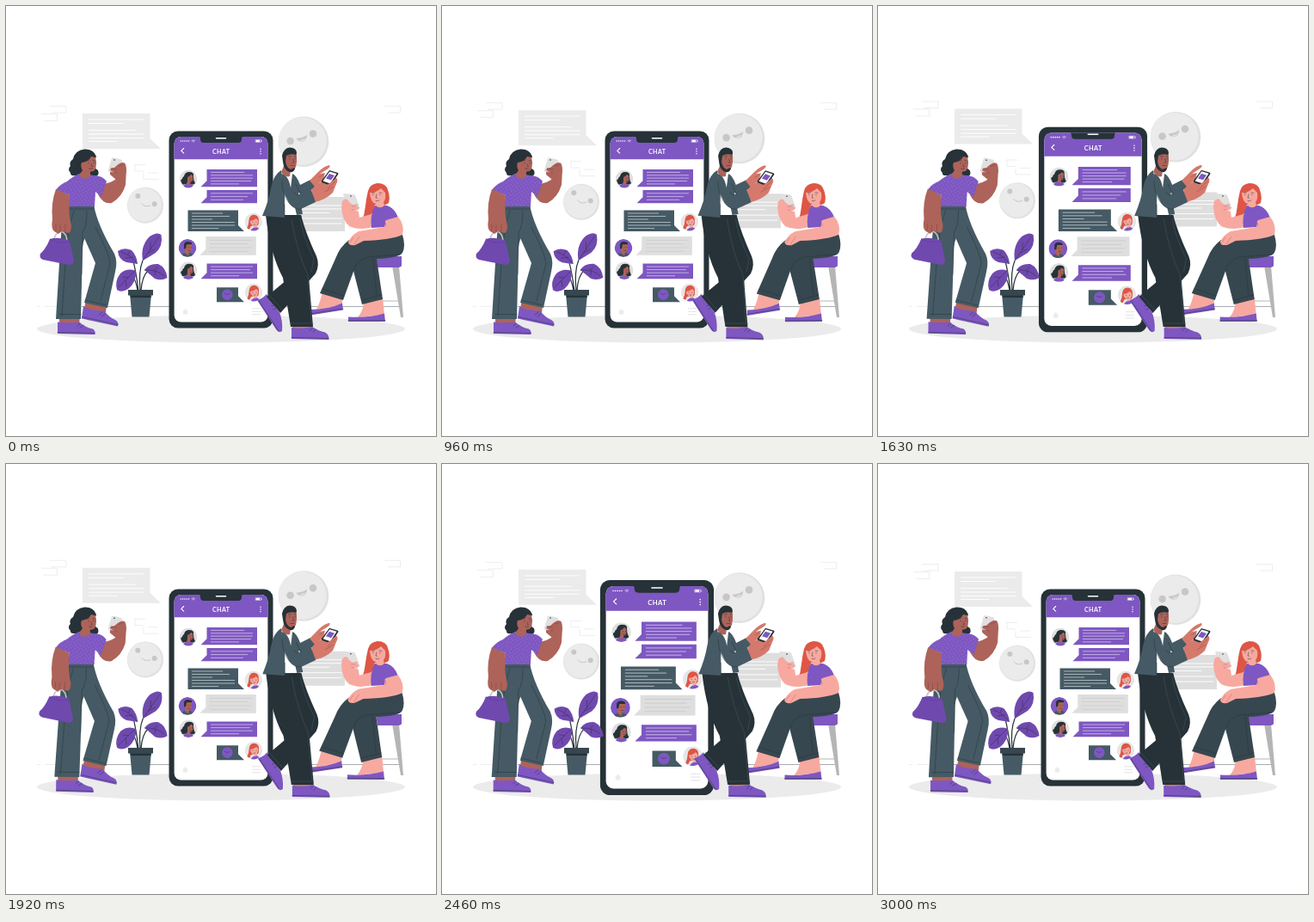
Write an HTML page that moves like this. It is 500 by 500 pixels and loops after 3.04 s.

```html
<!DOCTYPE html>
<html lang="en">
<head>
<meta charset="utf-8">
<title>Chat</title>
<style>
html, body { margin: 0; width: 100%; height: 100%; overflow: hidden; background: #fff }
svg { display: block; width: 100vw; height: 100vh }
.p { fill: #7e57c2 } .pd { fill: #7049af }
.d { fill: #263238 } .m { fill: #455a64 } .n { fill: #37474f }
.brown { fill: #ad6359 } .tan { fill: #d4796c } .pink { fill: #f7a9a0 } .red { fill: #de5645 }
.g { fill: #ebebeb } .h { fill: #c7c7c7 }
.l { fill: none; stroke: #263238; stroke-width: .5; stroke-linecap: round; stroke-linejoin: round }
.w { fill: none; stroke: #fff; stroke-linecap: round; stroke-linejoin: round }
text { font: 700 7px Lato, sans-serif; letter-spacing: .4px; fill: #fff; text-anchor: middle }
</style>
</head>
<body>
<svg viewBox="0 0 500 500">
<defs>
  <pattern id="dots" width="5" height="5" patternUnits="userSpaceOnUse" patternTransform="rotate(12)">
    <circle cx="1.2" cy="1.2" r=".4" fill="#c5b3e4"/><circle cx="3.7" cy="3.7" r=".4" fill="#c5b3e4"/>
  </pattern>
  <clipPath id="disc"><circle r="10.4"/></clipPath>
  <clipPath id="screen"><rect x="195.6" y="152" width="108.800" height="215.500" rx="8"/></clipPath>
  <g id="ava-a" clip-path="url(#disc)">
    <circle r="10.4" fill="#e0e0e0"/>
    <path class="d" d="M-5-3Q-4-8 1-8Q7-8 6-3Q6 2 8 5Q6 8 2 6L-4 6Q-7 8-8 4Q-10 1-7 0Q-7-2-5-3"/>
    <path class="p" d="M-7 11Q-5 5 0 5Q5 5 7 11z"/>
    <path class="brown" d="M-1-2Q2-3 3-5L5-4Q6 0 5 2Q4 4 2.500 3.500L2 6Q0 8-2 6L-1 3z"/>
    <path class="l" d="M2-1v.5M4.500-1v.5M2 2q1 .7 2 0"/>
  </g>
  <g id="ava-b" clip-path="url(#disc)">
    <circle r="10.4" fill="#e6e6e6"/>
    <path class="red" d="M-5-4Q-3-9 2-8Q7-7 6 1Q6 4 3 5L-3 5Q-5 11-10 11Q-7 7-6 3z"/>
    <path class="p" d="M-4 11Q-1 6 3 6Q7 7 8 11z"/>
    <path class="pink" d="M-4-1Q0-1 3-4L5-2Q6 1 4 3L4 6L1 7L0 5Q-2 5-2 3Q-4 2-4-1"/>
    <path class="l" d="M-1 0v.5M3 0v.5M0 3q1 .8 2 0"/>
  </g>
  <g id="ava-c" clip-path="url(#disc)">
    <circle class="p" r="10.4"/>
    <path class="m" d="M-8 11Q-6 5 0 5Q6 5 8 11z"/>
    <path class="brown" d="M-3-5H5L5 2Q4 5 2 5L1 9L-3 6z"/>
    <path class="d" d="M-4 1V-4Q-3-8 2-7L5-6L5-4L-1-4L-2 1z"/>
    <path class="l" d="M1-1v.5M4-1v.5M1 3h2"/>
  </g>
</defs>

<path d="M36 349.500h4M45 349.500H60" stroke="#dcdcdc" stroke-width=".5"/>
<path d="M88 349.500H190M311 349.500H457" stroke="#263238" stroke-width=".4"/>
<ellipse class="g" cx="250" cy="375.500" rx="214" ry="16"/>

<g id="back">
  <path fill="none" stroke="#e6e6e6" stroke-width=".7" d="M51 116.500H70V124H53M41 125.500H59.500V133.500H44M149 184.500H162M150 184.500V192H160M165 194H177M160 194V201.500H178M440 116.500H458.500V124H444"/>
  <path class="g" d="M89 125H167.500V154L180 166H89z"/>
  <path d="M335 222H394V262H335z" fill="#dedede"/>
  <path class="w" d="M96.500 132H160M96.500 136.500H137M96.500 144.500H150M96.500 149H160M96.500 153.500H160M96.500 157.500H129" stroke-width=".9"/>
  <path class="w" d="M342 232H390M342 236H390M342 240.500H376M342 247H390M342 253H390" stroke-width=".9"/>
  <circle cx="346" cy="157.800" r="29.300" fill="#e0e0e0"/>
  <circle cx="344.800" cy="157.200" r="27.800" fill="#ebebeb"/>
  <circle class="h" cx="330.600" cy="157" r="4.300"/><circle class="h" cx="357" cy="148.500" r="4.300"/>
  <path class="h" d="M337.500 154Q345 153.500 350 149.800Q350 157 344.500 157.800Q340 158 337.500 154"/>
  <path d="M341 157Q345 153.500 349 154Q347 157.600 344.500 157.800Q342.500 158 341 157" fill="#dcdcdc"/>
  <circle cx="162" cy="231.700" r="21" fill="#e0e0e0"/>
  <circle cx="161.200" cy="231.200" r="19.700" fill="#ebebeb"/>
  <circle class="h" cx="153.300" cy="221" r="3"/><circle class="h" cx="172.700" cy="230.300" r="3"/>
  <path d="M157.500 229.500Q161 234.500 168 232" fill="none" stroke="#c7c7c7"/>
</g>

<g id="phone">
  <rect class="d" x="189.500" y="145.500" width="121" height="229" rx="10.500"/>
  <g clip-path="url(#screen)">
    <path d="M195 151H305V368H195z" fill="#fff"/>
    <path class="p" d="M195 151H305V178.300H195z"/>
    <path class="d" d="M224 151Q226 152 226 155Q226 159 230 159H270Q274 159 274 155Q274 152 276 151z"/>
  </g>
  <path class="w" d="M244.500 153.800H255.500" stroke-width="1.500"/>
  <path class="w" d="M203.300 157H213" stroke-width="1.500" stroke-dasharray="0 2.300"/>
  <path class="w" d="M216 156.500q1.800-1.500 3.600 0M217 157.700q.8-.6 1.600 0" stroke-width=".6"/>
  <path class="w" d="M290.500 155.700h6v2.600h-6zM297.500 156.500v1" stroke-width=".5"/>
  <path d="M290.700 155.900h4.300v2.200h-4.300z" fill="#fff"/>
  <path class="w" d="M206.700 165.500L203.700 168.300L206.700 171.100" stroke-width="1.100"/>
  <path class="w" d="M296 166.300v5.800" stroke-width="1.500" stroke-dasharray="0 2.700"/>
  <text x="250.200" y="171.700">CHAT</text>
  <g id="chat"></g>
  <use href="#ava-a" x="212" y="201"/><use href="#ava-b" x="287.800" y="251"/>
  <use href="#ava-c" x="211" y="281.300"/><use href="#ava-a" x="212" y="307.700"/>
  <use href="#ava-b" x="288" y="333"/>
  <circle class="p" cx="257.300" cy="335.600" r="6.300"/>
  <path class="l" d="M254.300 334.500h.2M260 334.500h.2" stroke-width="1.300"/><path class="l" d="M255.800 335q1.500 1.200 3 0"/>
  <path d="M205 355.500l3.500-3.300l3.500 3.300h-1v3h-5v-3z" fill="#ebebeb"/>
  <path d="M286 351.800H296M286 355.300H296M286 358.800H296" stroke="#e0e0e0" stroke-width=".9"/>
</g>

<g id="leaves">
  <path class="l" style="stroke-width:1.200" d="M156 331Q154 308 159 296M154 331Q151 308 148 297M157 331Q158 314 166 307M153 331Q150 313 144 313"/>
  <path class="pd" d="M159 296Q156 279 167 268Q176 262 180.500 266Q183 279 174 287Q166 292 159 296M153 300Q147 299 140 298Q131 295 130 285Q137 280 146 284Q152 290 153 300M151 308Q152 321 142 329Q134 334 129 330Q126 320 133 311Q141 304 151 308M161 307Q166 299 177 300Q186 304 187.500 316Q181 320 173 317Q166 311 161 307"/>
  <path class="l" d="M159 296L178 268M168 283v-8M165 287l8-4M152 299Q143 288 134 286M147 292l-8 1M142 289l2-4M150 308L131 327M142 316l-6-1M139 319l1 7M161 307Q176 306 184 314M172 307l4-3M174 308l-1 5"/>
</g>
<path class="m" d="M144 335H169L166.500 361.500H146.500z"/>
<path class="n" d="M142 330H171V336.500H142z"/><path class="d" d="M144.500 336.500H168.700V339H145z"/>

<g id="walker">
  <path class="brown" d="M93 341L117 347L116 357L91 352zM62 360H86L85 371H62z"/>
  <path class="p" d="M90 349Q96 354 114 354.500Q120 362 127 365Q132 368 130 372.500L88 363.500zM60 367.500Q72 369 85 367.500Q93 374 101 375.500Q104.500 378 103.500 382L60 381z"/>
  <path class="l" d="M88.500 361.500L130 370.500M60 379.500L103 380.500M108 359l4-3M111 361l4-3M83 372l3-3M86 374l4-2.500"/>
  <path class="m" d="M102 231Q106 254 126 288Q130 297 127 309L118 351L91 345L104 299L88 263z"/>
  <path class="m" d="M72 231H103L98 262Q90 268 89 281L87 364H58L64 267Q65 244 72 231"/>
  <path class="l" d="M94 238Q94 257 89 263L88 312M79 238Q71 260 69 300L65 360M62 358.500H87M92 342L117 348M104 257Q120 288 121 299L110 343M74 236H102"/>
  <path class="brown" d="M107 219Q113 231 123 229Q135 222 139 208L140 190L131 191L127 202Q121 206 114 207z"/>
  <path class="d" d="M78 178Q80 168 91 166.500Q102 166 105 175L101 184Q103 189 107 191Q109 197 104 198Q99 200 95 196L88 196Q83 201 80 197Q75 198 75 194Q71 190 75 186Q73 181 78 178"/>
  <path class="p" d="M71 204Q79 197 88 194L102 197Q112 197 117 204L111 222L104 216L103 233H72L74 220L58 214Q63 207 71 204"/>
  <path d="M71 204Q79 197 88 194L102 197Q112 197 117 204L111 222L104 216L103 233H72L74 220L58 214Q63 207 71 204" fill="url(#dots)"/>
  <path class="brown" d="M88 182Q96 181 99 175L104 176Q106 182 104.500 188Q103 193 98 192.500L98 198Q92 204 85 197L89 191Q86 186 88 182"/>
  <path class="l" d="M96 182v1M102 182v1M94 180l3-1M101 179.500l2.500 .5M99 184l1.500 2.500l-1.500 .4M96.500 189q2 1.300 4 0"/>
  <path fill="#e0e0e0" d="M123 177Q124 176 125.500 176.500L134 178.500Q135.500 179 135 181L131.500 194Q131 195.500 129 195L120 193Q118.500 192 119 190.500z"/>
  <circle class="d" cx="126" cy="179" r=".8"/>
  <path class="brown" d="M126 188Q131 183 135 182L138 182.500Q140 185 140 191L138 200L127 201L121 196L121 193L127 194L121 191L122 188.500z"/>
  <path class="l" d="M123 189L129 190M122 193L129 194M131 186l5-1.500" style="stroke:#7c3f3b"/>
  <path fill="none" stroke="#c4c4c4" stroke-width="1.600" d="M55 274Q57 263 64 262Q71 264 71 275"/>
  <path class="brown" d="M58 213L74 220Q73 235 74 245L76 255Q76 263 73 264L65 262L61 265L56 262Q52 259 54 248Q52 229 58 213"/>
  <path class="l" style="stroke:#7c3f3b" d="M58 254v7M63 255v7M69 254v8"/>
  <path class="pd" d="M51 271Q62 268 74 273L79 296Q79 301 73 301L43 295Q38 293 40 288Q46 283 51 271"/>
  <path class="l" style="stroke:#5d399a" d="M51 271Q60 277 74 274"/>
</g>

<g>
  <path fill="#b5b5b5" d="M449 302H457L462 362H459zM436 342.500H458V343.500H436z"/>
  <path class="p" d="M430 291H460V302Q459 304 455 304H432z"/>
</g>
<g id="sitter">
  <path class="pink" d="M368 331L391 338L391 349Q376 353 361 353Q366 343 368 331M416 342L438 339L440 359L409 362Q416 354 416 342"/>
  <path class="p" d="M354 353Q375 353 391 345.500L392 353.500L354 359.500zM398 361.500Q420 363 440 357.500L441 367H398z"/>
  <path class="l" d="M354 358L392 352M398 365.700H441"/>
  <path class="n" d="M399 272Q388 280 383 294L365 334L392 342L405 306L440 276z"/>
  <path class="n" d="M397 278Q424 264 461 266Q465 279 461 287Q457 293 431 294L438 341L414 347L403 304Q399 292 397 278"/>
  <path class="l" d="M405 306Q407 296 420 292L458 289M414 342L437 336M368 329L393 337M427 294L431 336"/>
  <path class="red" d="M421 215Q423 207 432 206Q442 206 444 214Q447 222 445 229L438 233L429 231Q427 246 414 250Q417 242 418 232Q419 223 421 215"/>
  <path fill="#e0e0e0" d="M392 219Q392 218 394 218L404 219Q406 219 406.500 221L411 234Q411 236 409 236L398 234z"/>
  <circle class="d" cx="401" cy="221" r=".8"/>
  <path class="pink" d="M391 227Q396 221 399 228L403 231L409 230Q411 232 404 233L411 234Q412 237 404 237L410 239L411 246L425 242L430 256Q411 262 399 256Q391 249 390 234z"/>
  <path class="p" d="M429 232L443 232Q452 235 456 246L441 250L441 257L425 258Q423 243 429 232"/>
  <path class="pink" d="M423 217Q431 217 436 212Q439 215 441 217Q442 225 439 228L440 232Q436 236 431 233L430 230Q424 229 423 217"/>
  <path class="l" d="M427 219v1M435 219v1M431 219l-1 4l1.500 .3M430 226.500q2 1.500 4-.5M425.500 217.500l3-.7M434 217l3 .3"/>
  <path class="pink" d="M442 249L456 245Q464 255 461 266Q448 272 416 273L406 278Q398 279 398 274Q402 266 410 262L440 257z"/>
  <path class="l" style="stroke:#c8635c" d="M404 269l-4 6M411 268L405 277M441 250L442 256M402 233h7M402 237h7"/>
</g>

<g id="leaner">
  <path class="tan" d="M302 336L310 346L304 350L297 343zM333 370H355V377H333z"/>
  <path class="p" d="M292 342Q299 340 303 335Q308 344 318 356Q322 366 321 378Q317 381 314 376zM332 374Q344 376 356 373Q364 378 371 379.500Q376 382 375.500 388L332 387z"/>
  <path class="l" d="M294 343L317 378M332 385.500L375 386.500M309 349l5-2M311 353l5-3M353 378l3-3M357 379l3-3"/>
  <path class="d" d="M335 246L343 243Q348 263 361 291Q365 301 360 311L319 357L303 338L327 318z"/>
  <path class="d" d="M302 243H343L350 286L353 327L357 373H331L322 316Q307 288 302 243"/>
  <path class="l" style="stroke:#455a64" d="M332 248Q338 285 351 313L355 368M331 369H357M342 248Q346 271 358 294L355 309M305 335L321 353"/>
  <path d="M321 193L333 195L340 243H323z" fill="#fff"/>
  <path class="m" d="M333 195Q338 197 342 208L354 202L360 211L344 219L340 217L345 242L338 243L331 212z"/>
  <path class="m" d="M320 191Q311 196 308 212Q306 225 298 244L324 246L324 220L321 200z"/>
  <path class="brown" d="M322 172L337.500 171Q339 180 337 187Q335 192 331 191L330 198Q325 200 320 193L323 186z"/>
  <path class="d" d="M322 181L321 174Q323 165 330 164.500Q337 165 338 170L337.500 173Q331 171 326 174L325 181Q326 188 331 190L335 188L336 189.500Q334 194 330 193Q323 191 322 181"/>
  <path class="l" d="M330 177v1M336 177v1M328.500 175l3-.5M335 174.500l2 .3M333.500 178l1.600 4l-2 .4M331 185.500h4"/>
  <path class="tan" d="M353 203L363 193Q370 186 376 185Q379 187 370 192L365 195L371 194L369 202L359 210z"/>
  <path class="tan" d="M355 214Q362 205 369 204L382 199Q387 200 384 207L380 217Q371 226 358 228z"/>
  <path class="d" d="M376 191L386 194Q387 195 386 196L378 208Q377 209 376 208.500L367 205Q366 204 367 203z"/>
  <path d="M376.300 192.500L384.500 195L377 206.500L368.500 203.500z" fill="#fff"/><path class="p" d="M376 195L382 197L378 202.500L372 200.500z"/>
  <path class="tan" d="M365 211L375 207L384 200Q388 203 381 210L370 217z"/>
  <path class="l" style="stroke:#99463f" d="M374 212L383 204M371 216L381 210M364 199l5-3"/>
  <path class="m" d="M320 195Q328 196 331 211L339 220L354 212L360 228L343 236Q335 237 329 229L322 215z"/>
  <path class="l" d="M321 204Q321 219 329 229Q335 237 343 236M339 220L335 217M324 231V245M343 219L337 207"/>
</g>
</svg>
<script>
const LOOP = 3040, $ = id => document.getElementById(id);

// Message bubble: box, tail side (-1 left, 1 right), line widths
function message(x, y, w, h, side, fill, ink, rows) {
  const edge = side < 0 ? x : x + w, bottom = y + h;
  let lines = '';
  rows.forEach((len, i) => {
    lines += `M${x + 4.5} ${y + (i + 1) * h / (rows.length + 1)}h${len}`;
  });
  $('chat').innerHTML += `<path fill="${fill}" d="M${x} ${y}h${w}v${h}h${-w}z
    M${edge} ${bottom - 7}L${edge + side * 7} ${bottom}H${edge}z"/>
    <path d="${lines}" stroke="${ink}" stroke-width=".65"/>`;
}
const purple = '#7e57c2', slate = '#455a64';
message(233.5, 190, 58.5, 20.3, -1, purple, '#e5dcf5', [39, 49, 49, 47, 33]);
message(233.5, 214, 58.5, 15.2, -1, purple, '#e5dcf5', [49, 43, 38]);
message(211.5, 237.5, 58.5, 24.5, 1, slate, '#dfe5e8', [36, 44, 24, 50, 50, 31]);
message(232.3, 268, 58.5, 21.7, -1, '#dedede', '#c7c7c7', [50, 45, 49, 45]);
message(233.5, 299.5, 58.5, 17.8, -1, purple, '#e5dcf5', [49, 46, 49, 33]);
message(245, 327.3, 25, 17, 1, slate, '#fff', []);

// Piecewise linear value through [time, value] pairs
function track(keys, t) {
  const i = keys.findIndex(k => k[0] > t);
  if (i < 0) return keys[keys.length - 1][1];
  if (!i) return keys[0][1];
  const [a, u] = keys[i - 1], [b, v] = keys[i];
  return u + (v - u) * (t - a) / (b - a);
}
const beat = [[985, 1], [1285, 1.1], [1885, 1], [2185, 1], [2485, 1.1], [2785, 1]];
const hover = [[0, 0], [1500, -6], [3000, 0]];
const times = [0, 500, 960, 1330, 1920, 2460, 3000, LOOP];

// Body sway as sideways foot drift around a pivot near the head
const sways = [
  ['walker', 90, 180, 195, [0, -.5, 0, -1.2, -1.8, -.3, 1, 0]],
  ['leaner', 335, 185, 195, [0, .8, -1.6, .4, .9, 1.2, .2, 0]],
  ['sitter', 430, 215, 148, [0, -1, 1, .5, -1, .5, 0, 0]]
].map(([id, x, y, reach, drift]) =>
  ({ id, x, y, reach, keys: drift.map((d, i) => [times[i], d]) }));

function draw(now) {
  const t = now % LOOP, s = track(beat, t);
  $('back').setAttribute('transform', `translate(0 ${track(hover, t)})`);
  $('phone').setAttribute('transform', `translate(250 260) scale(${s}) translate(-250 -260)`);
  for (const { id, x, y, reach, keys } of sways) {
    const angle = -track(keys, t) / reach * 180 / Math.PI;
    $(id).setAttribute('transform', `rotate(${angle} ${x} ${y})`);
  }
  const bend = -.6 * Math.sin(t / LOOP * 2 * Math.PI);
  $('leaves').setAttribute('transform', `rotate(${bend} 156 332)`);
}
const start = performance.now();
(function frame() {
  draw(performance.now() - start);
  requestAnimationFrame(frame);
})();
</script>
</body>
</html>
```
